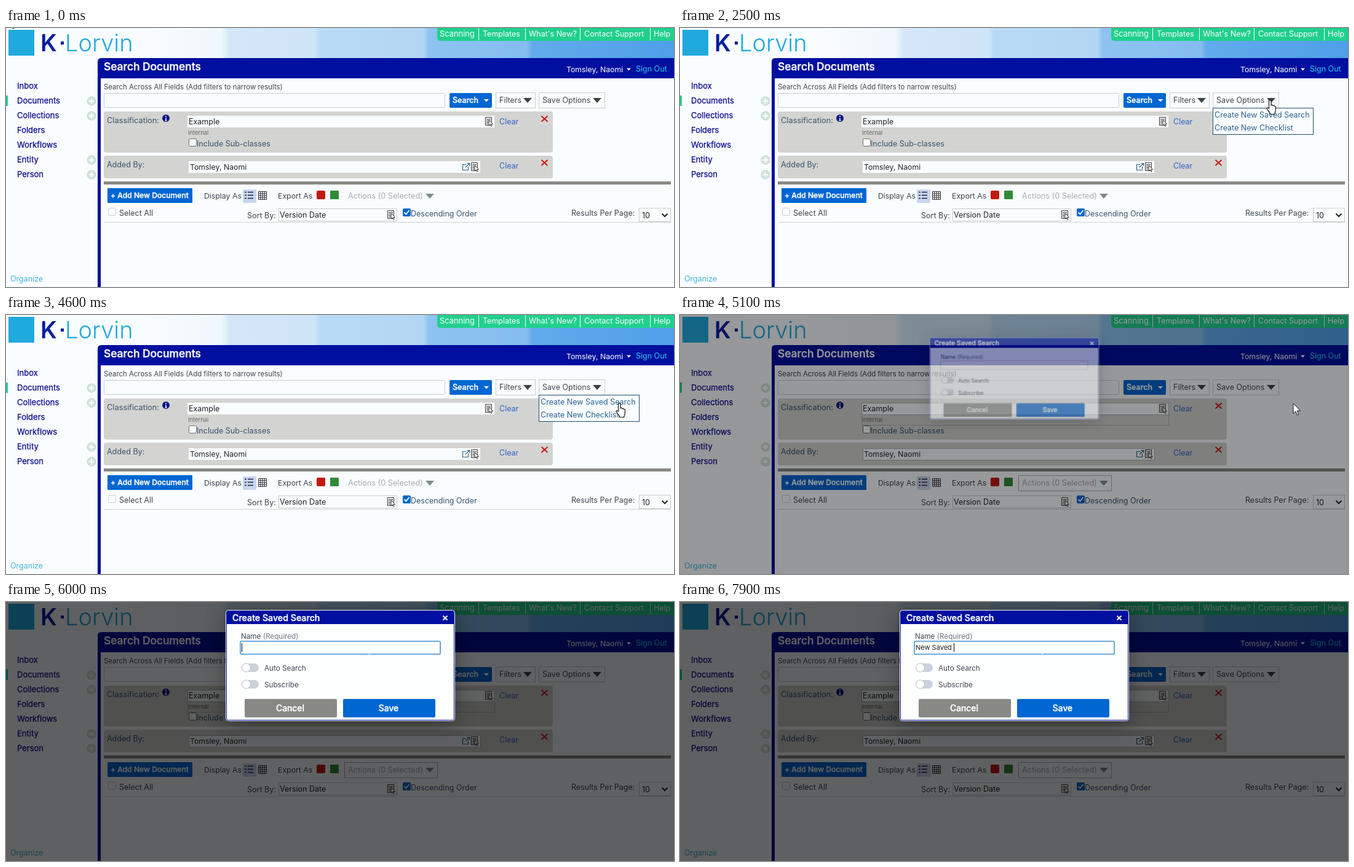
An HTML page that plays this animation: 1086 px wide and 422 px high, repeating every 8000 ms.

```html
<!DOCTYPE html>
<html lang="en">
<head>
<meta charset="utf-8">
<title>Saved search</title>
<style>
  html, body { margin: 0; width: 100%; height: 100%; overflow: hidden; background: #fafdff; }
  #stage { position: relative; width: 1086px; height: 422px; overflow: hidden; }
  svg { position: absolute; left: 0; top: 0; }
  text, #entry { font: 400 12.5px Inter, "Open Sans", sans-serif; fill: #3c4650; }
  .b { font-weight: 500; stroke: currentColor; stroke-width: .4px; }
  .w, .w text { fill: #fff; color: #fff; }
  .nav text { fill: #0b0b8e; color: #0b0b8e; font-size: 13px; stroke: currentColor; stroke-width: .25px; }
  .ink, .ink text { fill: #222; }
  .slate, .slate text { fill: #38526e; }
  .link, .link text { fill: #2e64c8; }
  .box { fill: #fafdff; stroke: #c8ccd0; }
  .panel { fill: #d3d4d1; }
  .blue { fill: #0066d2; }
  .navy { fill: #000f9f; }
  .line { fill: none; }

  .timed { animation: 8s step-end infinite; }
  #menu { animation-name: menu; }
  #dim { animation-name: dim; }
  #edges { animation-name: edges; }
  #dialog { animation-name: dialog; transform-origin: 543.5px 103.5px; filter: drop-shadow(0 4px 16px rgba(0,0,0,.35)); }
  .focus { animation-name: focus; }
  #beam { animation-name: beam; }
  #arrow { animation-name: arrow; }
  #hand { animation-name: hand; }
  #pointer { animation: travel 8s linear infinite; }

  @keyframes menu { 0%, 63.75% { opacity: 0 } 31.25% { opacity: 1 } 100% { opacity: 0 } }
  @keyframes dim { 0% { opacity: 0 } 63.75% { opacity: .4 } 65% { opacity: .6 } 66.25%, 100% { opacity: .62 } }
  @keyframes edges { 0% { opacity: 0 } 63.75%, 100% { opacity: 1 } }
  @keyframes dialog {
    0% { opacity: 0; transform: scale(.7) }
    63.75% { opacity: .52; transform: scale(.74) }
    65% { opacity: 1; transform: scale(1.022) }
    66.25% { opacity: 1; transform: scale(1.01) }
    67.5%, 100% { opacity: 1; transform: none }
  }
  @keyframes focus { 0% { opacity: 0 } 75%, 100% { opacity: 1 } }
  @keyframes beam {
    0% { opacity: 0; transform: none }
    71.25% { opacity: 1; transform: none }
    77.5%, 100% { opacity: 1; transform: translateX(-1px) }
  }
  @keyframes arrow { 0% { opacity: 1 } 8.75% { opacity: 0 } 63.75% { opacity: 1 } 70% { opacity: 0 } 100% { opacity: 0 } }
  @keyframes hand { 0% { opacity: 0 } 8.75% { opacity: 1 } 63.75% { opacity: 0 } 100% { opacity: 0 } }
  @keyframes travel {
    0%, .9% { transform: translate(5px, -18px); animation-timing-function: cubic-bezier(.4, 0, .3, 1) }
    11.25% { transform: translate(930px, 118px) }
    13.75%, 15% { transform: translate(934px, 118px) }
    17.5%, 19% { transform: translate(942px, 118px); animation-timing-function: ease-out }
    27.5%, 40% { transform: translate(959px, 118px); animation-timing-function: ease-in-out }
    46.25%, 50% { transform: translate(992px, 142px) }
    52.5%, 54% { transform: translate(998px, 148px) }
    57.5%, 65% { transform: translate(997px, 144px); animation-timing-function: ease-in-out }
    71.25%, 100% { transform: translate(590px, 74px) }
  }

  #entry { position: absolute; left: 383px; top: 66px; font-size: 11px; line-height: 16px; white-space: pre; color: #222; }
  #entry i { position: absolute; top: 1px; width: 1px; height: 14px; background: #000; }
</style>
</head>
<body>
<div id="stage">
<svg width="1086" height="422" viewBox="0 0 1086 422">
  <defs>
    <linearGradient id="sky" gradientUnits="userSpaceOnUse" x1="200" x2="1086" y1="0" y2="0">
      <stop offset="0" stop-color="#fafdff"/><stop offset=".17" stop-color="#f0f7fd"/>
      <stop offset=".184" stop-color="#d3e7f8"/><stop offset=".34" stop-color="#d0e5f7"/>
      <stop offset=".35" stop-color="#b8daf5"/><stop offset=".54" stop-color="#b2d7f4"/>
      <stop offset=".55" stop-color="#8cc3f0"/><stop offset=".73" stop-color="#84bdee"/>
      <stop offset=".74" stop-color="#62abeb"/><stop offset="1" stop-color="#4f9fe8"/>
    </linearGradient>
    <g id="plus">
      <circle r="7" fill="#d3e5dd" stroke="#bfd3ca"/>
      <path d="M-4 0H4M0-4V4" stroke="#fff" stroke-width="2"/>
    </g>
    <g id="picker">
      <path d="M.5.5H10.500V13.500H.5Z" fill="#fff" stroke="#333"/>
      <path d="M2 3.500H9M2 6H9M2 8.500H6M2 11H6" stroke="#333"/>
      <path d="M6 5V14L8.200 12 9.700 15.300 11.200 14.600 9.700 11.500H12.700Z" fill="#fff" stroke="#222" stroke-width=".8"/>
    </g>
    <path id="cross" d="M0 0L10 9M10 0L0 9" stroke="#c8100c" stroke-width="1.800"/>
    <path id="down" d="M0 0H14L7 8Z"/>
    <g id="toggle">
      <rect width="28" height="14" rx="7" fill="#cdd1da"/>
      <circle cx="7.500" cy="7" r="7" fill="#fff" stroke="#b9bec8"/>
    </g>
  </defs>

  <rect width="1086" height="422" fill="#fafdff"/>
  <rect x="200" width="886" height="49" fill="url(#sky)"/>
  <rect x="4" y="3" width="42" height="42" fill="#1fa9dd"/>
  <text x="56" y="38" style="font-size:38px;font-weight:600;fill:#0a1ea0">K</text>
  <rect x="89" y="22" width="5" height="5" fill="#0a1ea0"/>
  <text x="96" y="38" style="font-size:38px;font-weight:300;fill:#1fa9dd">Lorvin</text>

  <path d="M701 0H1086V21H707Q701 21 701 15Z" fill="#20d08c"/>
  <g class="w">
    <path d="M768.500 0V20M844.500 0V20M933.500 0V20M1047.500 0V20" stroke="#fff"/>
    <g style="font-size:13px">
      <text x="705" y="14" style="font-size:12.900px">Scanning</text>
      <text x="775" y="14">Templates</text>
      <text x="850" y="14">What's New?</text>
      <text x="940" y="14">Contact Support</text>
      <text x="1053" y="14">Help</text>
    </g>
  </g>

  <path class="navy" d="M149 422V55Q149 49 155 49H1086V82H154V422Z"/>
  <g class="w">
    <text class="b" x="159" y="69" style="font-size:17.400px">Search Documents</text>
    <text x="911" y="72" style="font-size:12.300px">Tomsley, Naomi</text>
    <path d="M1009 65.500H1016L1012.500 69.500Z"/>
  </g>
  <text x="1024" y="71" style="fill:#25b3e6;color:#25b3e6;stroke:currentColor;stroke-width:.2px">Sign Out</text>

  <g class="nav">
    <text x="18" y="99">Inbox</text>
    <text x="18" y="123">Documents</text>
    <text x="18" y="147">Collections</text>
    <text x="18" y="171">Folders</text>
    <text x="18" y="195">Workflows</text>
    <text x="18" y="219">Entity</text>
    <text x="18" y="243">Person</text>
  </g>
  <rect y="110" width="3" height="17" fill="#20d08c"/>
  <use href="#plus" x="139" y="119"/><use href="#plus" x="139" y="143"/>
  <use href="#plus" x="139" y="215"/><use href="#plus" x="139" y="239"/>
  <text x="7" y="413" style="fill:#45b0dc">Organize</text>

  <text x="159" y="100" style="font-size:11.400px">Search Across All Fields (Add filters to narrow results)</text>
  <rect class="box" x="159.500" y="106.500" width="554" height="23" rx="2"/>
  <rect class="blue" x="721" y="106" width="69" height="24" rx="2"/>
  <g class="w">
    <text class="b" x="726" y="122">Search</text>
    <path d="M777 116H785L781 120.500Z"/>
  </g>
  <rect class="box" x="796.500" y="105.500" width="64" height="25"/>
  <rect class="box" x="866.500" y="105.500" width="107" height="25"/>
  <text x="802" y="122">Filters</text>
  <text x="872" y="122">Save Options</text>
  <g fill="#3a4444"><use href="#down" x="841" y="114"/><use href="#down" x="954" y="114"/></g>

  <rect class="panel" x="159" y="136" width="730" height="67" rx="4"/>
  <rect class="panel" x="159" y="208" width="730" height="37" rx="4"/>
  <rect x="295" y="143" width="499" height="19" fill="#fafdff"/>
  <rect x="297" y="217" width="474" height="19" fill="#fafdff"/>
  <g class="slate">
    <text x="164" y="155" style="font-size:12.800px">Classification:</text>
    <text x="164" y="227">Added By:</text>
    <text x="310" y="193">Include Sub-classes</text>
    <text x="658" y="307">Descending Order</text>
  </g>
  <circle cx="260" cy="147" r="6" fill="#0b1a80"/>
  <path d="M260 143V145M260 146.200V151M258.500 150.700H261.500" stroke="#fff" stroke-width="1.400"/>
  <g class="ink">
    <text x="297" y="157">Example</text>
    <text x="299" y="231" style="font-size:12.300px">Tomsley, Naomi</text>
  </g>
  <text x="296" y="174" style="font-size:9.400px;fill:#666">Internal</text>
  <rect x="297.500" y="180.500" width="12" height="12" rx="2" fill="#fff" stroke="#666"/>
  <use href="#picker" x="779" y="145"/><use href="#picker" x="756" y="219"/>
  <path class="line" d="M748 222.500H742.500V231.500H751.500V226M747 227L753 221M749 220.500H753.500V225" stroke="#2f6484" stroke-width="1.200"/>
  <g class="link">
    <text x="802" y="157">Clear</text>
    <text x="802" y="229">Clear</text>
  </g>
  <use href="#cross" x="870.500" y="143.500"/><use href="#cross" x="870.500" y="215"/>
  <rect x="159" y="250" width="922" height="5" fill="#888885"/>

  <rect class="blue" x="165" y="261" width="138" height="24" rx="1"/>
  <text class="b w" x="170" y="277" style="font-size:12.100px">+ Add New Document</text>
  <text x="322" y="278" style="font-size:12.300px">Display As</text>
  <rect x="385" y="263" width="22" height="22" rx="2" fill="#c8d6f0"/>
  <path d="M388 267.500H391M388 272.500H391M388 277.500H391M393 267.500H402M393 272.500H402M393 277.500H402" stroke="#223" stroke-width="1.600"/>
  <path class="line" d="M410.500 266.500H423.500V279.500H410.500ZM410.500 269.700H423.500M410.500 273H423.500M410.500 276.300H423.500M413.700 266V280M417 266V280M420.300 266V280" stroke="#333"/>
  <text x="442" y="278" style="font-size:12.300px">Export As</text>
  <rect x="505" y="265" width="14" height="14" rx="2" fill="#c21a10"/>
  <rect x="527" y="265" width="14" height="14" rx="1" fill="#2f8a38"/>
  <text x="556" y="278" style="font-size:12.700px;fill:#a5adb1">Actions (0 Selected)</text>
  <use href="#down" x="682" y="270" fill="#7c8c8c"/>

  <rect class="box" x="166.500" y="293.500" width="12" height="12" rx="2"/>
  <text x="184" y="306">Select All</text>
  <text x="392" y="310">Sort By:</text>
  <rect class="box" x="443.500" y="294.500" width="192" height="20"/>
  <text class="ink" x="445" y="309">Version Date</text>
  <use href="#picker" x="620" y="297"/>
  <rect class="blue" x="645" y="294" width="13" height="13" rx="2"/>
  <path class="line" d="M647.500 300.500L650.500 303.500L655.500 297" stroke="#fff" stroke-width="1.800"/>
  <text x="919" y="306">Results Per Page:</text>
  <path d="M159 316.500H1081" stroke="#cfd2d4"/>
  <rect class="box" x="1029.500" y="293.500" width="51" height="22"/>
  <text class="ink" x="1034" y="310">10</text>
  <path class="line" d="M1066.500 302.500L1071 307L1075.500 302.500" stroke="#222" stroke-width="2"/>

  <g id="edges" class="timed line" stroke="#a8adb0">
    <path d="M295.500 143.500H794.500V179.500H295.500ZM295.500 162.500H794.500M297.500 217.500H771.500V236.500H297.500Z"/>
    <rect x="550.500" y="261.500" width="151" height="25"/>
  </g>

  <g id="menu" class="timed">
    <rect x="866.500" y="130.500" width="163" height="43" fill="#fafdff" stroke="#1f4e70"/>
    <g class="slate" style="font-size:12.400px">
      <text x="869" y="146" style="fill:#2a6290">Create New Saved Search</text>
      <text x="869" y="167" style="fill:#2a6290">Create New Checklist</text>
    </g>
  </g>

  <rect id="dim" class="timed" width="1086" height="422"/>

  <g id="dialog" class="timed">
    <rect x="357.500" y="13.500" width="372" height="180" rx="4" fill="#000f9f" stroke="#eef2ff"/>
    <path d="M359 36H728V190Q728 192 726 192H361Q359 192 359 190Z" fill="#fdffff"/>
    <text class="b w" x="368" y="31" style="font-size:14.200px">Create Saved Search</text>
    <path d="M710.500 22.500L717.500 29.500M717.500 22.500L710.500 29.500" stroke="#fff" stroke-width="2"/>
    <text x="382" y="60" style="font-size:11.700px">Name <tspan fill="#707880">(Required)</tspan></text>
    <rect x="381.500" y="64.500" width="323" height="19" fill="#fff" stroke="#b4b8bc"/>
    <g class="timed focus">
      <rect x="380" y="63" width="327" height="23" rx="3" fill="#bcdcf4"/>
      <rect x="381" y="64" width="325" height="21" rx="2" fill="#fff" stroke="#4f97cf" stroke-width="1.600"/>
    </g>
    <rect id="beam" class="timed" x="590" y="83" width="1" height="3" fill="#fff"/>
    <use href="#toggle" x="383" y="100"/><use href="#toggle" x="383" y="127"/>
    <text x="420" y="112" style="font-size:11.700px">Auto Search</text>
    <text x="420" y="139" style="font-size:11.700px">Subscribe</text>
    <rect x="388" y="158" width="150" height="30" rx="2" fill="#888885"/>
    <rect class="blue" x="548" y="158" width="150" height="30" rx="2"/>
    <g class="w" text-anchor="middle">
      <text class="b" x="462" y="178" style="font-size:13.800px">Cancel</text>
      <text class="b" x="622" y="178" style="font-size:13.800px">Save</text>
    </g>
  </g>

  <g id="pointer" fill="#fff" stroke="#111" stroke-linejoin="round">
    <path id="arrow" class="timed" d="M0 0V16.500L3.800 13L6.300 19L8.800 18L6.200 12H11.500Z"/>
    <path id="hand" class="timed" transform="translate(-6 -1)" stroke-width="1.200"
      d="M4.500 14V2.500a1.800 1.800 0 0 1 3.600 0V9a1.600 1.600 0 0 1 2.900.7a1.500 1.500 0 0 1 2.400.9a1.400 1.400 0 0 1 2 1.300V16c0 3-1.400 4-1.600 7.500H6.800C6 20 3 18 1.200 14.800c-.8-1.600 1-2.600 2.100-1.600z"/>
  </g>
</svg>
<div id="entry" class="timed focus"><span></span><i></i></div>
</div>
<script>
  const phrase = "New Saved ";
  const keyTimes = [6800, 6900, 7000, 7100, 7300, 7400, 7600, 7700, 7900, 7900];
  const typed = document.querySelector("#entry span");
  const caret = document.querySelector("#entry i");
  let start;

  function draw(now) {
    start ??= now;
    const t = (now - start) % 8000;
    typed.textContent = phrase.slice(0, keyTimes.filter(k => k <= t).length);
    caret.style.opacity = t >= 6500 && t < 6800 ? 0 : 1;
    requestAnimationFrame(draw);
  }
  requestAnimationFrame(draw);
</script>
</body>
</html>
```
